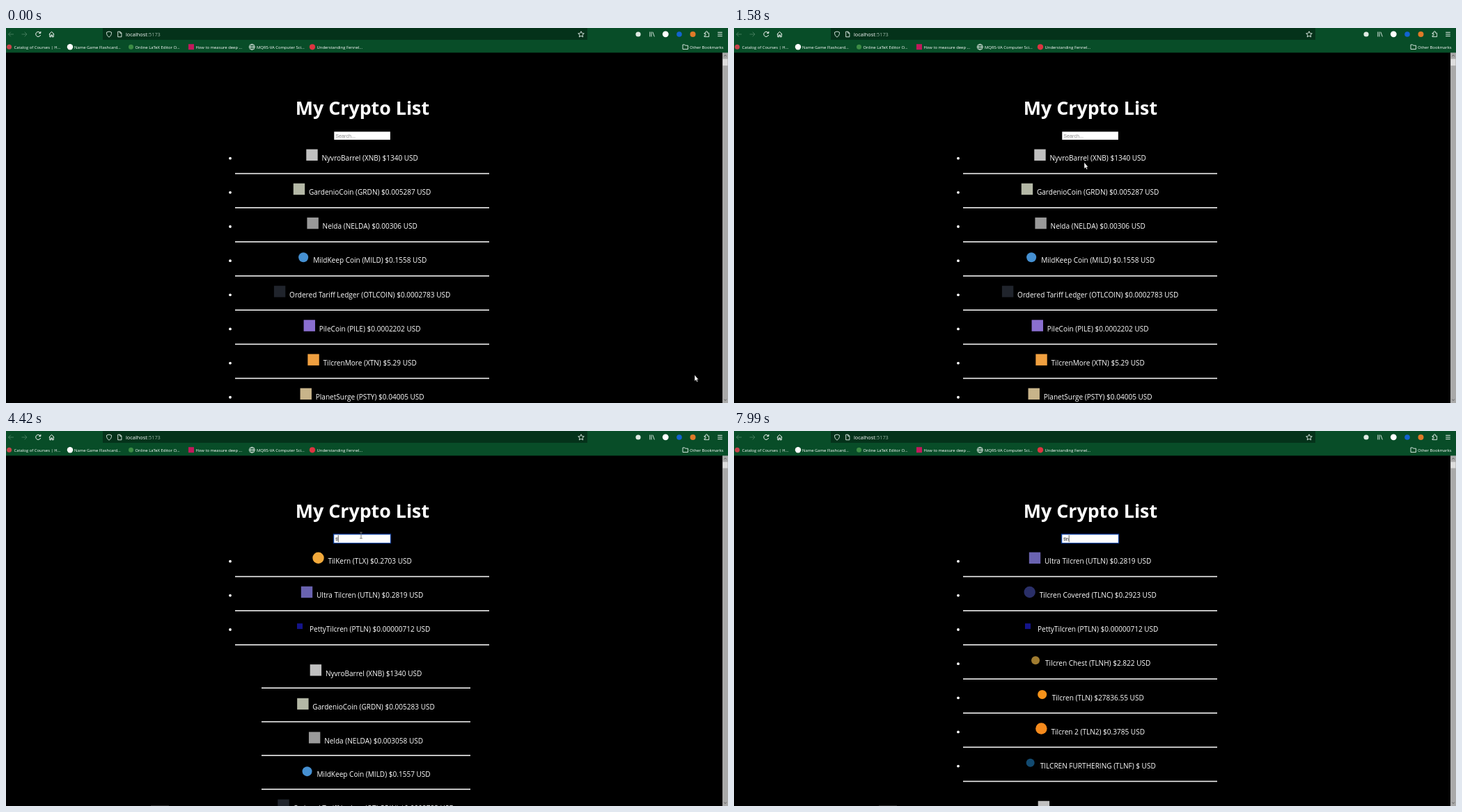
An HTML page with a canvas that plays this animation: 1037x540 px, repeating every 8280 ms.

```html
<!DOCTYPE html>
<html lang="en">
<head>
<meta charset="utf-8">
<title>My Crypto List</title>
<style>
  html, body { margin: 0; width: 100%; height: 100%; overflow: hidden; background: #000; }
  canvas { display: block; width: 1037px; height: 540px; }
</style>
</head>
<body>
<canvas id="stage"></canvas>
<script>
const W = 1037, H = 540, LOOP = 8280, FOCUS = 2550;
const SANS = '"Open Sans", "Noto Sans", sans-serif';
const FIELD = '"Liberation Sans", Arial, sans-serif';
const canvas = document.getElementById('stage');
const g = canvas.getContext('2d');
const dpr = window.devicePixelRatio || 1;
canvas.width = W * dpr;
canvas.height = H * dpr;
g.scale(dpr, dpr);

// name, price, later price, icon colour, icon size, round icon
const coin = (name, price, later, color, size = 16.4, round = false) =>
  ({ name, price, later, color, size, round });

const listed = [
  coin('NyvroBarrel (XNB)', '1340', '1340', '#c0c0c0'),
  coin('GardenioCoin (GRDN)', '0.005287', '0.005283', '#b4b8a6'),
  coin('Nelda (NELDA)', '0.00306', '0.003058', '#9a9a9a'),
  coin('MildKeep Coin (MILD)', '0.1558', '0.1557', '#4590d2', 14, true),
  coin('Ordered Tariff Ledger (OTLCOIN)', '0.0002783', '0.0002783', '#20242c'),
  coin('PileCoin (PILE)', '0.0002202', '0.0002202', '#8a6fd0'),
  coin('TilcrenMore (XTN)', '5.29', '5.29', '#f0a040'),
  coin('PlanetSurge (PSTY)', '0.04005', '0.04005', '#c8b48a'),
  coin('Plume Coin (PLM)', '0.008625', '0.008625', '#14172a', 16, true),
  coin('Copsecoin (COPSE)', '0.0035', '0.0035', '#2a2a2a', 14, true),
  coin('Candorly (CDL)', '1.75', '1.75', '#23282f')
];
const found = {
  kern: coin('TilKern (TLX)', '0.2703', '', '#f2a93b', 16.4, true),
  ultra: coin('Ultra Tilcren (UTLN)', '0.2819', '', '#6a63b0'),
  covered: coin('Tilcren Covered (TLNC)', '0.2923', '', '#2a2f68', 16.4, true),
  petty: coin('PettyTilcren (PTLN)', '0.00000712', '', '#14148a', 8),
  chest: coin('Tilcren Chest (TLNH)', '2.822', '', '#a07c30', 12, true),
  base: coin('Tilcren (TLN)', '27836.55', '', '#f7931a', 13, true),
  two: coin('Tilcren 2 (TLN2)', '0.3785', '', '#f58a1c', 16.4, true),
  further: coin('TILCREN FURTHERING (TLNF)', '', '', '#124a70', 12, true),
  more: listed[6],
  surge: listed[7]
};

// start time, typed text, matches so far
const searches = [
  [4080, 't', 'more surge'],
  [4180, 't', 'more surge kern'],
  [4280, 't', 'more surge kern ultra'],
  [4420, 'tl', 'kern ultra petty'],
  [4470, 'tl', 'kern ultra covered petty'],
  [4600, 'tl', 'kern ultra covered petty chest'],
  [4740, 'tln', 'ultra covered petty chest'],
  [4820, 'tln', 'ultra covered petty chest two'],
  [5270, 'tln', 'ultra covered petty chest base two'],
  [5340, 'tln', 'ultra covered petty chest base two further']
].map(([at, query, ids]) => ({ at, query, coins: ids.split(' ').map(id => found[id]) }));

// pointer moves: start, end, steps, bezier points
const moves = [
  [70, 890, 13, [989, 500], [800, 300], [470, 130], [503, 194]],
  [1860, 2450, 9, [503, 194], [504, 180], [512, 160], [510, 150]],
  [6330, 7090, 11, [510, 150], [530, 170], [590, 240], [626, 289]],
  [7160, 7920, 12, [626, 289], [740, 390], [960, 450], [1018, 546]]
];

const ease = u => u * u * (3 - 2 * u);
const stepped = (t, a, b, n) =>
  t < a ? 0 : Math.min(n, Math.floor((t - a) / (b - a) * (n - 1) + 1e-6) + 1) / n;
const bezier = (a, b, c, d, u) => {
  const v = 1 - u;
  return v * v * v * a + 3 * v * v * u * b + 3 * v * u * u * c + u * u * u * d;
};
const lastStarted = (list, t, start) => list.filter(item => start(item) <= t).pop();

function rect(x, y, w, h, color) {
  g.fillStyle = color;
  g.fillRect(x, y, w, h);
}
function disc(x, y, r, color) {
  g.fillStyle = color;
  g.beginPath();
  g.arc(x, y, r, 0, 7);
  g.fill();
}
function text(str, x, y, size, color = '#fff', font = SANS, weight = 400) {
  g.font = `${weight} ${size}px ${font}`;
  g.fillStyle = color;
  g.fillText(str, x, y);
}
function line(path, color = '#e8f2ec', width = 0.9) {
  g.strokeStyle = color;
  g.lineWidth = width;
  g.stroke(new Path2D(path));
}

function row(c, price, cx, base) {
  const label = `${c.name} $${price} USD`;
  g.font = `10.06px ${SANS}`;
  const x = cx - (g.measureText(label).width + 22.2) / 2;
  const mx = x + 8.2, my = base - 8.2, s = c.size;
  if (c.round) disc(mx, my, s / 2, c.color);
  else rect(mx - s / 2, my - s / 2, s, s, c.color);
  text(label, x + 22.2, base, 10.06);
}

function page(t, scroll, search) {
  text('My Crypto List', 415.7, 125.3 - scroll, 26.8, '#fff', SANS, 700);
  field(t, scroll, search);
  const coins = search ? search.coins : listed;
  coins.forEach((c, i) => {
    const base = 191 + i * 49.15 - scroll;
    disc(322, base - 3.3, 1.9, '#fff');
    row(c, c.price, 511.6, base);
    rect(329, base + 17.8, 365, 1.6, '#f2f2f2');
  });
  if (!search) return;
  listed.forEach((c, i) => {
    const base = 205.1 + coins.length * 49.15 + i * 48.6;
    row(c, c.later, 517, base);
    rect(367, base + 16.7, 300, 1.6, '#f2f2f2');
  });
}

function field(t, scroll, search) {
  const focused = t >= FOCUS, y = 149 - scroll;
  if (focused) {
    rect(469.8, y - 1.2, 83.4, 14.4, '#0a2f78');
    rect(470.6, y - 0.4, 81.8, 12.8, '#1452b8');
  }
  rect(471.3, y + 0.3, 80.6, 11.6, '#fff');
  const typed = search ? search.query : '';
  text(typed || 'Search...', 473.2, y + 8.9, 7.2, typed ? '#222' : '#8a8a8a', FIELD);
  const since = t >= 4740 ? 4740 : t >= 4080 ? 4080 : FOCUS;
  if (focused && Math.floor((t - since) / 530) % 2 === 0)
    rect(473.2 + g.measureText(typed).width, 150, 0.7, 10, '#222');
}

function scrollbar(scroll, search) {
  rect(1029, 35, 8, 505, '#a9a9a9');
  rect(1029.5, 44.5 + scroll / 120, 7, search ? 9 : 9.6, '#dedede');
  line('M1031.3 40.8l1.8-2 1.8 2M1031.3 534.5l1.8 2 1.8-2', '#555', 0.8);
}

function browserBar() {
  rect(0, 0, W, 35.5, '#084d28');
  rect(139, 0, 696, 17, '#04321a');
  line('M11 9H3.5M6.8 5.7L3.5 9l3.3 3.3M22.5 9H30M26.7 5.7L30 9l-3.3 3.3', '#4b7f61');
  line('M49.3 7.2A3.5 3.5 0 1 0 49.6 10M49.8 5v2.6h-2.6', '#fff', 1);
  line('M61.8 9l3.7-3.6L69.2 9M62.8 8.4v4.4h1.9V10h1.6v2.8h1.9V8.4', '#fff', 1);
  line('M148 5l3.5 1.2c.2 3.2-1 5.4-3.5 7-2.5-1.6-3.7-3.8-3.5-7z');
  line('M160.7 5.2h3.2l2 2v5.6h-5.2zM163.7 5.2v2.2h2.2');
  text('localhost', 172, 11.8, 7.4, '#fff');
  const hostWidth = g.measureText('localhost').width;
  text(':5173', 172 + hostWidth, 11.8, 7.4, '#9bb5a6');
  line('M826 4.8l1.3 2.8 3 .3-2.3 2 .7 3-2.7-1.5-2.7 1.5.7-3-2.3-2 3-.3z');

  disc(908, 9, 3.6, '#dfeae3');
  line('M924.8 5.5v7M927 5.5v7M928.8 5.7l2.5 6.8');
  disc(947.3, 8.8, 4.4, '#fff');
  disc(967, 9, 3.8, '#1263d0');
  disc(986.5, 9, 4, '#df7a28');
  line('M1003 7.2h2V6a1.3 1.3 0 0 1 2.6 0v1.2h2v5.4h-6.6v-1.6h1a1.2 1.2 0 0 0 0-2.4h-1z');
  line('M1022.2 6.3h6.6M1022.2 9h6.6M1022.2 11.7h6.6', '#fff');

  disc(4.6, 27.3, 3.5, '#c8434a');
  disc(92, 27.3, 4.2, '#fff');
  disc(179.5, 27.3, 3.5, '#3c8c44');
  rect(262, 23.2, 8, 8, '#c2185b');
  line('M349.3 27.3a4 4 0 1 0 8 0a4 4 0 1 0-8 0h8M353.3 23.3c-2.4 2.5-2.4 5.5 0 8c2.4-2.5 2.4-5.5 0-8', '#fff', 0.8);
  disc(440, 27.3, 4.1, '#dc3440');
  line('M972 24h2.8l1 1.2h3.7v5.3H972z');
  const marks = [
    ['Catalog of Courses | H...', 11.5],
    ['Name Game Flashcard...', 98],
    ['Online LaTeX Editor O...', 185.5],
    ['How to measure deep ...', 272.5],
    ['MQRS-VA Computer Sci...', 360],
    ['Understanding Fennel...', 446.5],
    ['Other Bookmarks', 982]
  ];
  for (const [label, x] of marks) text(label, x, 29.8, 5.9, '#fff', SANS, 500);
}

function pointer(t) {
  const [a, b, n, p, q, r, s] = lastStarted(moves, t, m => m[0]) || moves[0];
  const u = ease(stepped(t, a, b, n));
  const x = bezier(p[0], q[0], r[0], s[0], u);
  const y = bezier(p[1], q[1], r[1], s[1], u);
  g.save();
  g.translate(x, y);
  if (x > 471 && x < 552 && y > 149 && y < 161) {
    line('M-1.8-4H1.8M0-4V4.5M-1.8 4.5H1.8', '#777', 0.9);
  } else {
    const arrow = new Path2D('M0-.5V8.4l2-1.7 1.4 3 1.3-.6-1.3-2.9h2.3z');
    g.fillStyle = '#fff';
    g.fill(arrow);
    g.strokeStyle = '#000';
    g.lineWidth = 0.4;
    g.stroke(arrow);
  }
  g.restore();
}

function draw(now) {
  const t = now % LOOP;
  const down = stepped(t, 960, 1240, 5), up = stepped(t, 1370, 1580, 4);
  const scroll = 166.5 * (ease(down) - ease(up));
  const search = lastStarted(searches, t, s => s.at);
  rect(0, 0, W, H, '#000');
  page(t, scroll, search);
  if (t >= FOCUS) rect(208, 539, 26, 1, '#2a2a2a');
  scrollbar(scroll, search);
  browserBar();
  pointer(t);
}

const began = performance.now();
function tick() {
  draw(performance.now() - began);
  requestAnimationFrame(tick);
}
tick();
</script>
</body>
</html>
```
